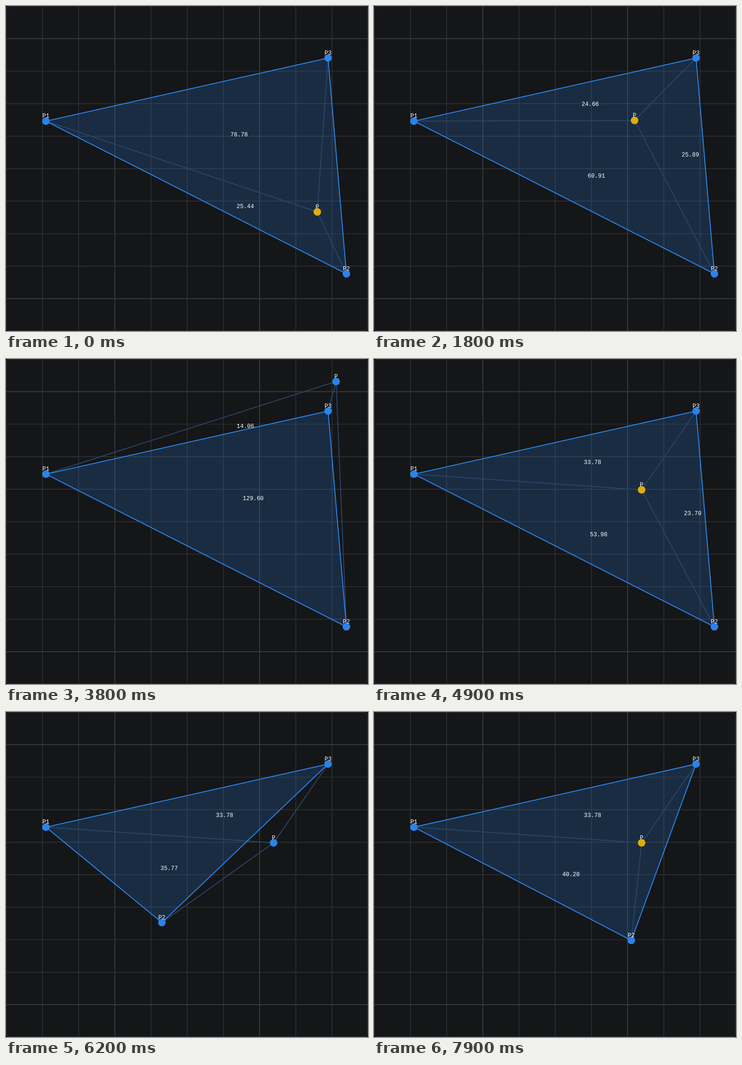
An HTML page for the animation above (8 s loop, 771 by 693 pixels).

```html
<!DOCTYPE html>
<html lang="en">
<head>
<meta charset="utf-8">
<title>Point in triangle</title>
<style>
  html, body { margin: 0; width: 100%; height: 100%; overflow: hidden; background: #101113; }
  svg { display: block; }
  text { font: 12.35px "Liberation Mono", monospace; fill: #fff; }
  .name { text-anchor: middle; }
  .grid { stroke: #38393f; stroke-width: 1.2; }
  .heavy { stroke: #3d3e44; stroke-width: 1.7; }
  .spoke { stroke: #2a4467; stroke-width: 2; }
</style>
</head>
<body>
<svg id="stage" width="771" height="693" viewBox="0 0 771 693"></svg>
<script>
const W = 771, H = 693, LOOP = 8000, STEP = 100;
const BLUE = '#2a83ea', YELLOW = '#e0ad0a';
const UNIT = 1263.77;   // square pixels per unit of area
const MIN_AREA = 10;    // smaller parts get no label

const P1 = [85, 245.5], P3 = [685.95, 110.95];

const easeIn = s => 1 - Math.cos(s * Math.PI / 2);
const easeOut = s => Math.sin(s * Math.PI / 2);
const easeInOut = s => (1 - Math.cos(s * Math.PI)) / 2;

// Each drag starts where the one before ended; `bend` curves it
const dragP = {
  home: [663, 439],
  moves: [
    { from: 300, to: 2000, end: [551.23, 237.19] },
    { from: 2100, to: 3800, end: [703, 48], bend: [600, 60], ease: easeIn },
    { from: 3800, to: 4900, end: [570, 279], bend: [817, 50], ease: easeOut }
  ]
};
const dragP2 = {
  home: [725, 571],
  moves: [
    { from: 5500, to: 6400, end: [279.94, 432.82] },
    { from: 6500, to: 7200, end: [464.8, 225.2] },
    { from: 7300, to: 7900, end: [548, 487] }
  ]
};

function position({ home, moves }, t) {
  let pos = home;
  for (const { from, to, end, bend, ease = easeInOut } of moves) {
    if (t <= from) break;
    const u = ease(Math.min(1, (t - from) / (to - from))), v = 1 - u;
    pos = pos.map((a, k) => {
      const mid = bend ? bend[k] : (a + end[k]) / 2;
      return a * v * v + 2 * mid * u * v + end[k] * u * u;
    });
  }
  return pos;
}

const stage = document.getElementById('stage');

function set(el, attrs) {
  for (const key in attrs) el.setAttribute(key, attrs[key]);
}

function add(tag, attrs) {
  const el = document.createElementNS('http://www.w3.org/2000/svg', tag);
  set(el, attrs);
  return stage.appendChild(el);
}

const cross = (a, b, c) =>
  (b[0] - a[0]) * (c[1] - a[1]) - (b[1] - a[1]) * (c[0] - a[0]);

// Panel and grid
add('rect', { x: .5, y: .5, width: W - 1, height: H - 1, rx: 8, fill: '#151618', stroke: '#38393f' });
const weight = heavy => heavy ? 'grid heavy' : 'grid';
for (let i = 1; i < 10; i++) {
  const x = i * W / 10 + .5, y = i * H / 10 + .4;
  add('line', { class: weight(i === 3 || i === 7), x1: x, x2: x, y1: 1, y2: H - 1 });
  add('line', { class: weight(i === 1 || i === 9), x1: 1, x2: W - 1, y1: y, y2: y });
}

// Moving parts, back to front
const area = add('polygon', { fill: BLUE, 'fill-opacity': .2 });
const spokes = [0, 1, 2].map(() => add('line', { class: 'spoke' }));
const edge = add('polygon', { fill: 'none', stroke: BLUE, 'stroke-width': 2 });
const dots = [0, 1, 2, 3].map(() => add('circle', { r: 8, fill: BLUE }));
const names = ['P1', 'P2', 'P3', 'P'].map(name => {
  const el = add('text', { class: 'name' });
  el.textContent = name;
  return el;
});
const labels = [0, 1, 2].map(() => add('text', {}));

function draw(t) {
  const p = position(dragP, t);
  const tri = [P1, position(dragP2, t), P3];
  const points = tri.join(' ');
  set(area, { points });
  set(edge, { points });

  [...tri, p].forEach(([x, y], i) => {
    set(dots[i], { cx: x, cy: y });
    set(names[i], { x, y: y - 7.3 });
  });

  const parts = tri.map((a, i) => {
    const b = tri[(i + 1) % 3], part = cross(a, b, p);
    const size = Math.abs(part) / 2 / UNIT;
    set(spokes[i], { x1: a[0], y1: a[1], x2: p[0], y2: p[1] });
    set(labels[i], { x: (a[0] + b[0] + p[0]) / 3, y: (a[1] + b[1] + p[1]) / 3 + 12.6 });
    labels[i].textContent = size >= MIN_AREA ? size.toFixed(2) : '';
    return part;
  });
  const inside = parts.every(s => s > 0) || parts.every(s => s < 0);
  set(dots[3], { fill: inside ? YELLOW : BLUE });
}

const start = performance.now();
function tick() {
  const t = (performance.now() - start) % LOOP;
  draw(Math.floor(t / STEP) * STEP);
  requestAnimationFrame(tick);
}
tick();
</script>
</body>
</html>
```
